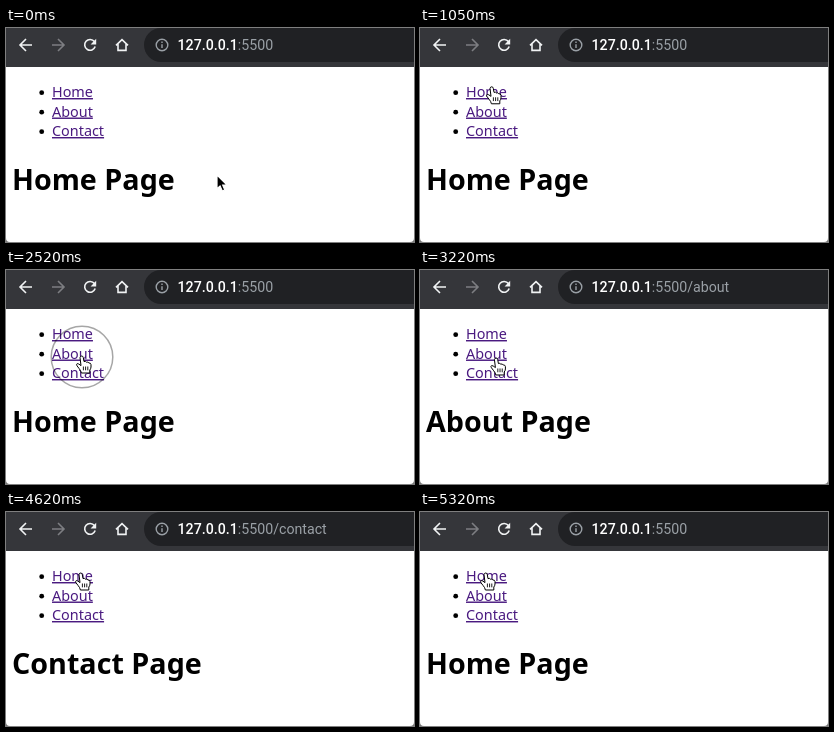
An HTML page that plays this animation: 408 px wide and 214 px high, repeating every 5.74 s.

```html
<!DOCTYPE html>
<html lang="en">
<head>
<meta charset="utf-8">
<title>Page navigation</title>
<style>
  html, body { margin: 0; width: 100%; height: 100%; overflow: hidden; background: #fff; }
  svg { display: block; width: 408px; height: 214px; }
  .page { font-family: "Noto Sans", "Open Sans", sans-serif; }
  .link { font-size: 14.4px; fill: #4a1a80; text-decoration: underline; }
  .title { font-size: 28.7px; font-weight: 700; }
  .url { font-family: Roboto, Inter, sans-serif; font-size: 14.2px; fill: #9aa0a6; }
  .host { fill: #fff; font-weight: 500; }
  .icons { fill: none; stroke: #f1f3f4; stroke-width: 1.6; }
</style>
</head>
<body>
<svg viewBox="0 0 408 214">
  <rect width="408" height="214" fill="#fff"/>
  <path d="M0 210v4h4q-4 0-4-4M408 210v4h-4q4 0 4-4" fill="#777"/>

  <rect width="408" height="39" fill="#35363a"/>
  <rect x="138" width="300" height="34" rx="17" fill="#202124"/>
  <g class="icons">
    <path d="M26 17H14M20 11l-6 6 6 6"/>
    <path d="M46 17h12M52 11l6 6-6 6" stroke="#7d7e82"/>
    <path d="M88.4 13.6A5.4 5.4 0 1 0 89.2 18.6"/>
    <path d="M90.2 10.8v5.6h-5.6z" fill="#f1f3f4" stroke="none"/>
    <path d="M110 17.4l6-5.8 6 5.8M112 16v6.4h8V16"/>
    <g stroke="#9aa0a6" stroke-width="1.4">
      <circle cx="156" cy="17" r="5.8"/>
      <path d="M156 16.2v3.9M156 13.4v1.5"/>
    </g>
  </g>
  <text class="url" x="171.5" y="22"><tspan class="host">127.0.0.1</tspan>:5500<tspan id="path"></tspan></text>

  <g class="page">
    <g id="menu"></g>
    <text class="title" id="title" x="6" y="162.3"></text>
  </g>

  <g id="cursor">
    <circle id="ring" cy="1" r="30.8" fill="none" stroke="#000" stroke-opacity=".35" stroke-width="1.5"/>
    <path id="arrow" d="M0 0V13.8L3.1 10.9 5.3 16 7.8 14.9 5.7 10H10z"
          stroke="#fff" stroke-width="1.2"/>
    <g id="hand" stroke="#000" stroke-linejoin="round">
      <path fill="#fff" d="M-2 1.6Q-1.6 0-.3 0 1 0 1.3 1.6L2 5.6Q3.6 4.8 4.4 6.2 6 5.4 6.8 7 8.6 6.6 9 8.6V11Q8.8 13 7.8 14V17H-.6Q-1 14.6-3 12.4L-5 9.8Q-6 8-4.8 7.6-3.6 7.4-1 9.6z"/>
      <path fill="none" stroke-width=".9" d="M1.4 10.5v3.8M3.6 10.5v3.8M5.8 10.5v3.8"/>
    </g>
  </g>
</svg>

<script>
const LOOP = 5740, STEP = 70, ROW = 19.5;
const PAGES = ["Home", "About", "Contact"];

const origin = { x: 211, y: 147 };
const glides = [
  { from: 0, to: 630, x: 75, y: 66 },
  { from: 630, to: 770, x: 72, y: 57 },
  { from: 910, to: 1400, x: 72, y: 66 },
  { from: 1610, to: 2030, x: 76, y: 86 },
  { from: 3150, to: 3500, x: 80, y: 105 },
  { from: 4130, to: 4620, x: 75, y: 61 },
  { from: 4760, to: 4970, x: 66, y: 61 }
];
// The heading changes on release, the address one step later.
const clicks = [
  { down: 1190, up: 1330, page: "Home" },
  { down: 2520, up: 2660, page: "About" },
  { down: 3780, up: 3850, page: "Contact" },
  { down: 5110, up: 5250, page: "Home" }
];

const el = id => document.getElementById(id);
const show = (id, on) => el(id).setAttribute("visibility", on ? "visible" : "hidden");
const ease = k => k * k * (3 - 2 * k);

el("menu").innerHTML = PAGES.map((name, i) => `
  <circle cx="35.7" cy="${64.7 + i * ROW}" r="2.4"/>
  <text class="link" x="46" y="${69 + i * ROW}">${name}</text>`).join("");

function pointerAt(t) {
  return glides.reduce((p, g) => {
    const k = ease(Math.min(1, Math.max(0, (t - g.from) / (g.to - g.from))));
    return { x: p.x + (g.x - p.x) * k, y: p.y + (g.y - p.y) * k };
  }, origin);
}

const pageAt = t => clicks.reduce((page, c) => t >= c.up ? c.page : page, PAGES[0]);

function draw(now) {
  const t = Math.floor((now % LOOP) / STEP) * STEP;
  const { x, y } = pointerAt(t);
  const overLink = x < 98 && y < 112;
  const address = pageAt(t - STEP);

  el("cursor").setAttribute("transform", `translate(${x} ${y})`);
  show("arrow", !overLink);
  show("hand", overLink);
  show("ring", clicks.some(c => t >= c.down && t < c.up));
  el("title").textContent = `${pageAt(t)} Page`;
  el("path").textContent = address === PAGES[0] ? "" : "/" + address.toLowerCase();
}

const start = performance.now();
function tick() {
  draw(performance.now() - start);
  requestAnimationFrame(tick);
}
tick();
</script>
</body>
</html>
```
